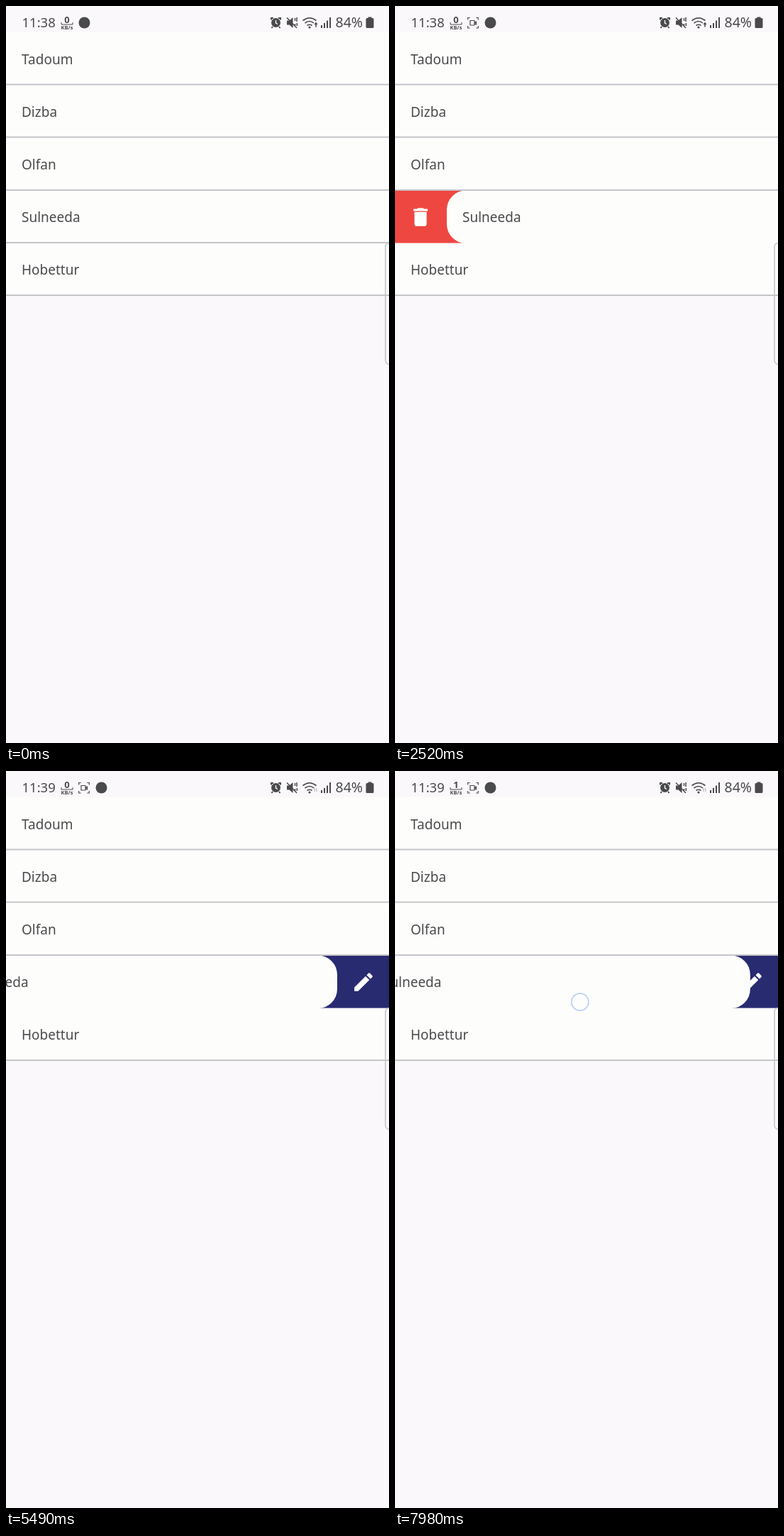
An HTML page for the animation above (8 s loop, 540 px wide and 1037 px high).

```html
<!DOCTYPE html>
<html lang="en">
<head>
<meta charset="utf-8">
<title>Swipe list</title>
<style>
  html, body { margin: 0; width: 100%; height: 100%; overflow: hidden; background: #fbf8fc; }
  svg { display: block; width: 540px; height: 1037px; }
  text { font: 19px "Noto Sans", "Open Sans", sans-serif; fill: #4a4a4c; }
  .time { font-size: 18.5px; }
  .rate { font: bold 13px "Noto Sans", sans-serif; text-anchor: middle; }
  .unit { font: bold 7.5px "Noto Sans", sans-serif; text-anchor: middle; }
  .ink { fill: #4a4a4c; }
  .stroke { fill: none; stroke: #4a4a4c; stroke-width: 1.6; }
  .thin { stroke-width: 1.2; }
  .rule { stroke: #c6c5c9; stroke-width: 1.8; }
  .white { fill: #fdfdfc; }

  /* one loop is 8 s, so 1% is 80 ms */
  .card, .touch, .dot, .rec { animation: 8s linear infinite; }
  .red, .navy, .line, .cam, .early, .late, .zero, .one { animation: 8s step-end infinite; }
  .card { animation-name: slide; }
  .touch { animation-name: touch; }
  .dot { animation-name: dot; }
  .rec { animation-name: rec; transform-origin: 110px 24px; }
  .red { animation-name: red; }
  .navy { animation-name: navy; }
  .line { animation-name: line; }
  .cam { animation-name: cam; }
  .early { animation-name: early; }
  .late { animation-name: late; }
  .zero { animation-name: zero; }
  .one { animation-name: one; }

  @keyframes slide {
    0% { transform: translateX(0); }
    12.5% { transform: translateX(0); animation-timing-function: ease-in-out; }
    15.9% { transform: translateX(60px); animation-timing-function: ease-out; }
    16.9% { transform: translateX(73px); }
    33.4% { transform: translateX(73px); animation-timing-function: ease; }
    37.5% { transform: translateX(0); }
    50.5% { transform: translateX(0); animation-timing-function: ease-in-out; }
    59.9% { transform: translateX(-99px); }
    61.5% { transform: translateX(-101px); animation-timing-function: ease; }
    65.5% { transform: translateX(-73px); }
    77.5% { transform: translateX(-73px); animation-timing-function: ease; }
    81.6% { transform: translateX(0); }
    85.4% { transform: translateX(0); animation-timing-function: ease-in-out; }
    89.125% { transform: translateX(80px); animation-timing-function: ease-out; }
    90.5% { transform: translateX(86px); animation-timing-function: ease-in; }
    94% { transform: translateX(68px); }
    97.5% { transform: translateX(0); }
    99.75% { transform: translateX(-39px); }
    100% { transform: translateX(-42px); }
  }
  @keyframes touch {
    0%, 11.37% { opacity: 0; transform: translate(264px, 312px); }
    11.38% { opacity: 1; transform: translate(264px, 312px); }
    12.3% { opacity: 1; transform: translate(268px, 312px); animation-timing-function: ease-in-out; }
    15.9% { opacity: 1; transform: translate(346px, 307.5px); }
    19.4% { opacity: 0; transform: translate(346px, 307.5px); }
    49.24% { opacity: 0; transform: translate(378px, 312px); }
    49.25% { opacity: 1; transform: translate(378px, 312px); }
    50.5% { opacity: 1; transform: translate(370px, 312px); animation-timing-function: ease-in-out; }
    59.9% { opacity: 1; transform: translate(266px, 327.5px); }
    61.5% { opacity: 1; transform: translate(264px, 327.5px); }
    64% { opacity: 0; transform: translate(264px, 327.5px); }
    84.37% { opacity: 0; transform: translate(290px, 321px); }
    84.38% { opacity: 1; transform: translate(290px, 321px); }
    85.4% { opacity: 1; transform: translate(302px, 320px); animation-timing-function: ease-in-out; }
    89.125% { opacity: 1; transform: translate(386px, 311px); animation-timing-function: ease-out; }
    90.5% { opacity: 1; transform: translate(392px, 310px); animation-timing-function: ease-in; }
    94% { opacity: 1; transform: translate(373px, 312px); }
    97.5% { opacity: 1; transform: translate(302px, 320px); }
    99.75% { opacity: 1; transform: translate(261px, 325px); }
    100% { opacity: 1; transform: translate(258px, 325px); }
  }
  @keyframes dot {
    0%, .37% { transform: translateX(0); animation-timing-function: ease; }
    4.4%, 100% { transform: translateX(24px); }
  }
  @keyframes rec {
    0%, .37% { opacity: 0; transform: scale(.3); }
    4.4%, 100% { opacity: 1; transform: scale(1); }
  }
  @keyframes red {
    0%, 37.5%, 97.5%, 100% { visibility: hidden; }
    12.5%, 85.4% { visibility: visible; }
  }
  @keyframes navy {
    0%, 81.6% { visibility: hidden; }
    50.5%, 97.5%, 100% { visibility: visible; }
  }
  @keyframes line {
    0%, 37.5%, 81.6% { visibility: visible; }
    12.5%, 50.5%, 85.4%, 100% { visibility: hidden; }
  }
  @keyframes cam {
    0%, 31%, 68.25%, 100% { visibility: visible; }
    25.25%, 43.4% { visibility: hidden; }
  }
  @keyframes early { 0% { visibility: visible; } 68.25%, 100% { visibility: hidden; } }
  @keyframes late { 0% { visibility: hidden; } 68.25%, 100% { visibility: visible; } }
  @keyframes zero { 0% { visibility: visible; } 94.25%, 100% { visibility: hidden; } }
  @keyframes one { 0% { visibility: hidden; } 94.25%, 100% { visibility: visible; } }
</style>
</head>
<body>
<svg viewBox="0 0 540 1037">
  <rect width="540" height="1037" fill="#fbf8fc"/>
  <rect class="white" y="37" width="540" height="370"/>

  <!-- status bar, left -->
  <text class="time early" x="22.5" y="30">11:38</text>
  <text class="time late" x="22.5" y="30">11:39</text>
  <text class="rate zero" x="86" y="24">0</text>
  <text class="rate one" x="86" y="24">1</text>
  <path class="stroke" style="stroke-width:1" d="M78 23v3h16v-3"/>
  <text class="unit" x="86" y="33">KB/s</text>
  <g class="rec">
    <path class="stroke thin" d="M102.7 19.5v-3h3M114.3 16.500h3v3M117.300 28v3h-3M105.700 31h-3v-3"/>
    <path class="stroke thin cam" d="M106 20.500h6v6.500h-6zM112 23.500l2.500-1.500v4l-2.500-1.500"/>
  </g>
  <circle class="ink dot" cx="110.5" cy="23.5" r="8"/>

  <!-- status bar, right -->
  <g>
    <circle class="ink" cx="380.5" cy="23.5" r="6.5"/>
    <path class="stroke" style="stroke-width:2" d="M374 19.500v-2.500h3M384 17h3v2.500M376 29l-1.500 2M385 29l1.500 2"/>
    <path d="M380.500 20v4l2.500 1.500" fill="none" stroke="#fbf8fc" stroke-width="1.4"/>
  </g>
  <path class="ink" d="M396 20.500h3.500l5-4.500v15l-5-4.500h-3.500z"/>
  <path class="stroke" style="stroke-width:1.5" d="M396 16.500L410 31M407.500 17v4M410 16v6M407.500 25v3M410.300 24v4"/>
  <path class="stroke" d="M418.500 20.500q9.500-7.500 19 0M421.500 24q6.500-5 12.500 0M424.500 27.500q3.500-2.500 7 0"/>
  <circle class="ink" cx="428" cy="30" r="1.6"/>
  <path class="early ink" d="M437 22.500l2.500 3.500h-1.700v3.500h-1.600v-3.500h-1.700z"/>
  <path class="late" d="M435 29v-5M437.800 24v5" fill="none" stroke="#bdbbc2" stroke-width="1.3"/>
  <path class="stroke" style="stroke-width:2" d="M445 31v-4M449 31v-7M453 31v-10.500M457 31v-15"/>
  <text x="464.5" y="30" style="font-size:19.5px">84%</text>
  <path class="ink" d="M510.500 15.500h5v1.500h1.500q1.500 0 1.500 1.500v11q0 1.500-1.500 1.500h-8q-1.500 0-1.500-1.500v-11q0-1.500 1.500-1.500h1.500z"/>

  <!-- list -->
  <text x="22" y="82">Tadoum</text>
  <text x="22" y="156">Dizba</text>
  <text x="22" y="230">Olfan</text>
  <text x="22" y="378">Hobettur</text>

  <g class="red">
    <rect y="259" width="270" height="74.5" fill="#ee4741"/>
    <path transform="translate(36 297) scale(1.43) translate(-12 -12)" fill="#fff"
      d="M6 19c0 1.100.9 2 2 2h8c1.100 0 2-.9 2-2V7H6zM19 4h-3.500l-1-1h-5l-1 1H5v2h14z"/>
  </g>
  <g class="navy">
    <rect x="270" y="259" width="270" height="74.5" fill="#282b70"/>
    <path transform="translate(504 297) scale(1.43) translate(-12 -12)" fill="#fff"
      d="M3 17.250V21h3.750L17.810 9.940l-3.750-3.750zM20.710 7.040c.39-.39.39-1.020 0-1.410l-2.340-2.340c-.39-.39-1.020-.39-1.410 0l-1.830 1.830 3.750 3.750z"/>
  </g>
  <g class="card">
    <rect class="white" y="259.5" width="540" height="74.5" rx="27"/>
    <text x="22" y="304">Sulneeda</text>
  </g>

  <!-- edge handle -->
  <rect x="535" y="333.5" width="16" height="170.5" rx="5" fill="#fbf9fc" fill-opacity=".5" stroke="#c6c5c9" stroke-width="1.6"/>

  <path class="rule" d="M0 110.500h540M0 184.500h540M0 259h540M0 407h540"/>
  <path class="rule line" d="M0 333h540"/>

  <circle class="touch" r="12" fill="#fdfdfd" fill-opacity=".6" stroke="#aec8f3" stroke-width="1.5"/>
</svg>
</body>
</html>
```
